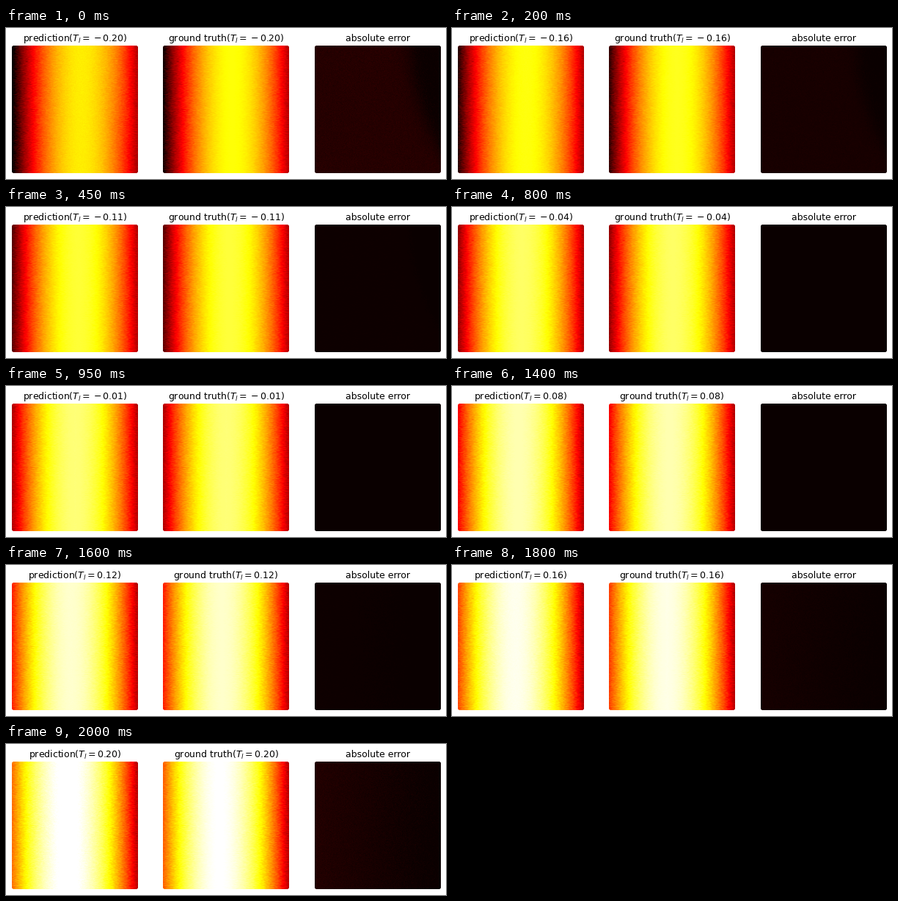
These frames come from a looping animation (600x206 px, 2050 ms). A matplotlib script:

```python
import numpy as np
import matplotlib.pyplot as plt
from matplotlib.animation import FuncAnimation
from matplotlib.patches import FancyBboxPatch

W, H, DPI = 600, 206, 75
FRAMES, INTERVAL = 41, 50
PW, PH, TOP = 172, 174, 24
LEFTS = (8, 214, 421)
VMIN, VMAX = -0.2, 0.605

rng = np.random.default_rng(4)
x, y = np.meshgrid((np.arange(PW) + 0.5) / PW, (np.arange(PH) + 0.5) / PH)


def grain():
    """Sampling jitter along x, in short horizontal runs."""
    n = rng.normal(0, 0.008, (PH, PW + 2))
    return (n[:, :-2] + n[:, 1:-1] + n[:, 2:]) / 2


pos = np.clip(x + grain(), 0, 1)
speck = rng.normal(0, 0.003, (PH, PW))


def temperature(t_left):
    return t_left * (1 - pos) + 2 * pos * (1 - pos)


def error(t_left):
    strength = (abs(t_left) / 0.2) ** 3
    if t_left < 0:
        edge = 0.76 + 0.35 * y ** 2
        shape = 0.025 / (1 + np.exp((x - edge) * 25))
    else:
        shape = 0.022 * np.clip(1 - x, 0, 1)
    return strength * np.clip(shape + speck, 0, None)


fig = plt.figure(figsize=(W / DPI, H / DPI), dpi=DPI, facecolor="white")
ax = fig.add_axes((0, 0, 1, 1))
ax.axis("off")


def panel(left, vmin, vmax):
    img = ax.imshow(np.zeros((PH, PW)), cmap="hot", vmin=vmin, vmax=vmax,
                    extent=(left, left + PW, TOP + PH, TOP),
                    interpolation="nearest", aspect="auto")
    clip = FancyBboxPatch((left, TOP), PW, PH, transform=ax.transData,
                          boxstyle="round,pad=0,rounding_size=2.5")
    img.set_clip_path(clip)
    title = ax.text(left + PW / 2, 18, "", fontsize=12, ha="center",
                    va="baseline", family="DejaVu Sans")
    return img, title


pred, pred_title = panel(LEFTS[0], VMIN, VMAX)
truth, truth_title = panel(LEFTS[1], VMIN, VMAX)
err, err_title = panel(LEFTS[2], 0, 0.6)
err_title.set_text("absolute error")
ax.set_xlim(0, W)
ax.set_ylim(H, 0)


def update(i):
    t = (i - 20) / 100
    sign = "{}-" if t < 0 else ""
    label = f"($T_l={sign}{abs(t):.2f}$)"
    pred_title.set_text("prediction" + label)
    truth_title.set_text("ground truth" + label)
    u, e = temperature(t), error(t)
    truth.set_data(u)
    pred.set_data(u + e * np.sign(t))
    err.set_data(e)
    return pred, truth, err, pred_title, truth_title


anim = FuncAnimation(fig, update, frames=FRAMES, interval=INTERVAL,
                     repeat=True, repeat_delay=0, blit=False)
plt.show()
```
